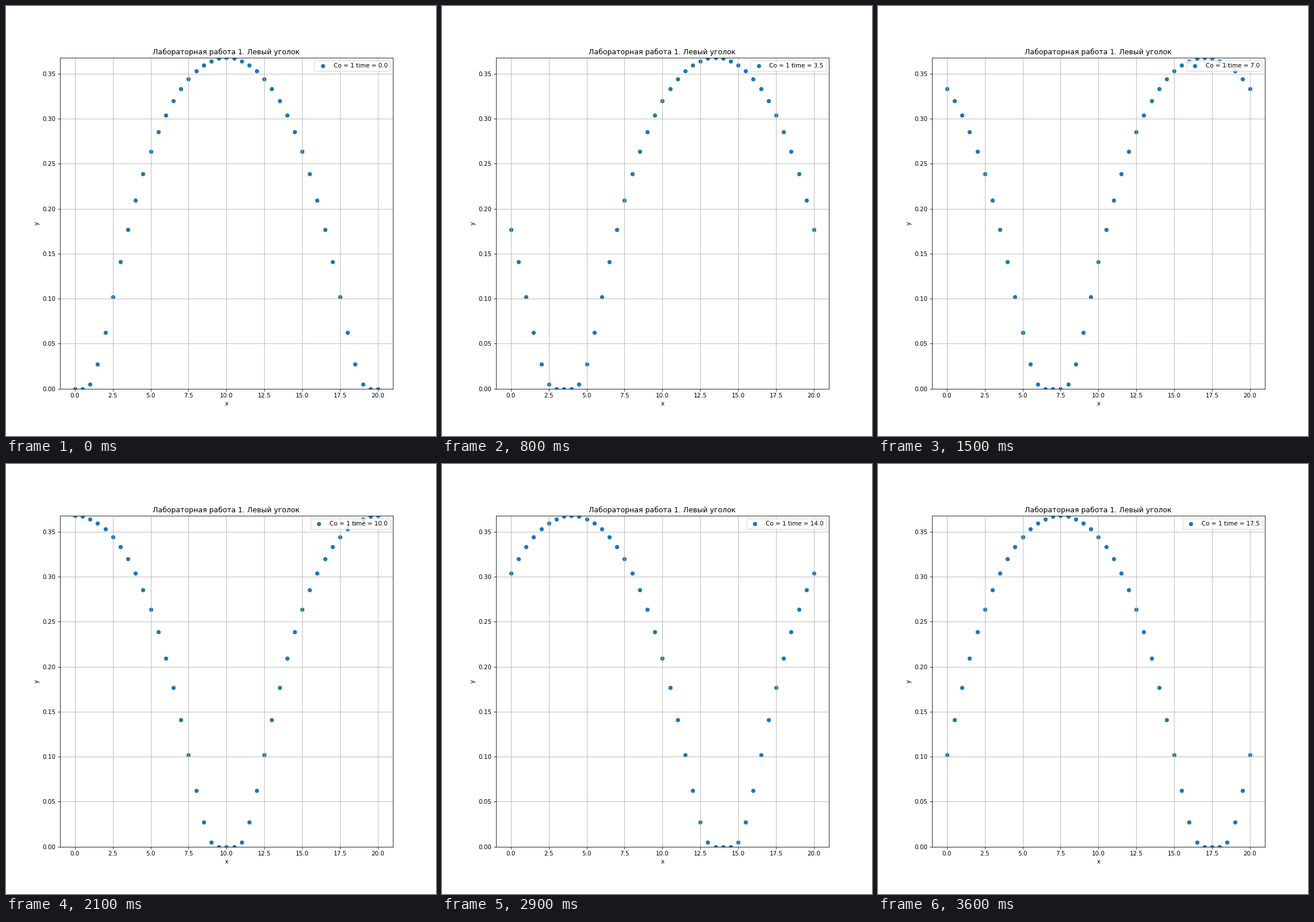
Recreate the animation shown at these times as a matplotlib script. Size 748 by 748 pixels, loop 3700 ms.

```python
import numpy as np
import matplotlib.pyplot as plt
from matplotlib.animation import FuncAnimation

LENGTH = 20.0   # length of the periodic domain
STEP = 0.5      # grid step, equal to the time step at Co = 1
FRAMES = 37
INTERVAL = 100

x = np.arange(0, LENGTH + STEP, STEP)


def bump(pos):
    """Smooth hump exp(-1 / (1 - s^2)), repeated every LENGTH."""
    half = LENGTH / 2
    s = (pos % LENGTH - half) / half
    room = 1 - s ** 2
    inside = room > 0
    return np.where(inside, np.exp(-1 / np.where(inside, room, 1)), 0)


def label(t):
    return f"Co = 1 time = {t:.1f}"


fig, ax = plt.subplots(figsize=(10, 10), dpi=74.8)
fig.subplots_adjust(left=0.125, right=0.9, bottom=0.11, top=0.88)

dots = ax.scatter(x, bump(x), label=label(0))
ax.set_xlim(-1, LENGTH + 1)
ax.set_ylim(0, np.exp(-1))
ax.set_title("Лабораторная работа 1. Левый уголок")
ax.set_xlabel("x")
ax.set_ylabel("y")
ax.grid()
caption = ax.legend(loc="upper right").get_texts()[0]


def update(i):
    # the starting state is held for two ticks
    t = max(0, i - 1) * STEP
    dots.set_offsets(np.column_stack([x, bump(x - t)]))
    caption.set_text(label(t))
    return dots, caption


anim = FuncAnimation(fig, update, frames=FRAMES, interval=INTERVAL,
                     repeat=True, repeat_delay=0, blit=False)
plt.show()
```
